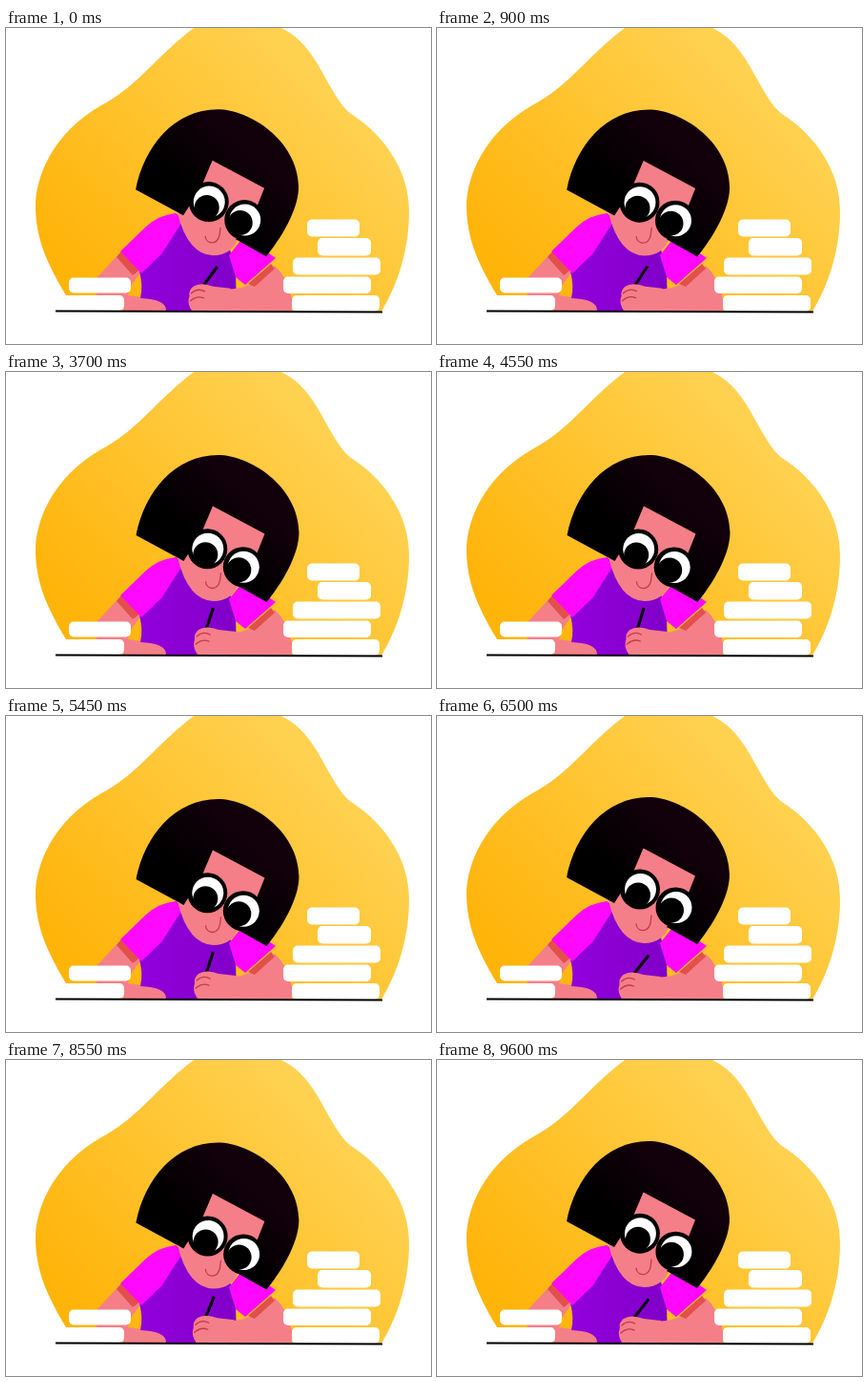
Animation, 446 px wide and 331 px high, one loop 9.65 s. Source, as an HTML page:

```html
<!DOCTYPE html>
<html lang="en">
<head>
<meta charset="utf-8">
<title>Girl writing</title>
<style>
  html, body { margin: 0; width: 100%; height: 100%; overflow: hidden; background: #fff; }
  svg { display: block; width: 100vw; height: 100vh; }
  .skin { fill: #f57f88; }
  .sleeve { fill: #ff08ff; }
  .cuff { fill: #e2504c; }
  .line { fill: none; stroke: #c43a4c; stroke-width: 1.3; stroke-linecap: round; }
</style>
</head>
<body>
<svg viewBox="0 0 446 331">
  <defs>
    <linearGradient id="sun" gradientUnits="userSpaceOnUse" x1="90" y1="260" x2="310" y2="40">
      <stop stop-color="#ffb40a"/><stop offset="1" stop-color="#ffd150"/>
    </linearGradient>
    <linearGradient id="hairShade" x1="0" y1="1" x2="1" y2="0">
      <stop offset=".4" stop-color="#000"/><stop offset=".7" stop-color="#12000a"/>
    </linearGradient>
    <linearGradient id="dress" x1="0" x2="1">
      <stop stop-color="#9300dc"/><stop offset="1" stop-color="#8000c8"/>
    </linearGradient>
  </defs>

  <path fill="url(#sun)" d="M72 297L66 285C45 250 30 222 31 182C34 145 56 104 107 77C140 58 163 25 197 0H289C328 18 337 70 362 90C398 113 423 150 423 192C423 235 410 270 394 297Z"/>

  <!-- body and left arm -->
  <path class="skin" d="M119 236L95 262V285L125 296H168C169 289 162 284 150 283L128 280L131 270L141 256Z"/>
  <path fill="url(#dress)" d="M178 194L158 225L140 255Q144 270 141 283Q168 284 168 296H242L241 255L235 232L215 225Z"/>
  <path class="cuff" d="M122 233L116 240L133 259L142 252Z"/>
  <path class="sleeve" d="M120 234L147 208Q160 196 178 194L185 203L163 237L142 257Z"/>

  <!-- right arm -->
  <path class="skin" d="M282 249L260 267Q242 276 220 273V296H300V284Q296 262 282 249Z"/>
  <path class="cuff" d="M254 268L278 247L282 252L261 271Z"/>
  <path class="sleeve" d="M234 238L250 218L283 241L251 269L241 261Z"/>

  <g id="head">
    <path class="skin" d="M216 138L275 169L262 222L244 218Q238 238 217 238Q191 237 180 194L190 165Z"/>
    <path fill="url(#hairShade)" d="M136 169C145 123 177 85 222 85C255 85 306 117 307 166C307 185 295 212 273 239L241 221L262 190L271 167.500L216.500 138.500L204 168L186 196Z"/>
    <path class="line" d="M209 218C210 226 221 228 224 217L225 209"/>
  </g>

  <g id="glasses">
    <circle cx="213" cy="181.500" r="21"/>
    <circle cx="250.500" cy="200.500" r="21"/>
    <circle cx="213.500" cy="181.500" r="16.500" fill="#fff"/>
    <circle cx="251" cy="200.500" r="16.500" fill="#fff"/>
    <circle cx="211" cy="187.500" r="13"/>
    <circle cx="246" cy="203.500" r="13"/>
  </g>

  <path id="pen" stroke="#000" stroke-width="3"/>
  <g id="hand">
    <path class="skin" d="M235 273L217 271Q204 266 196 271Q191 275 192 281Q189 289 195 297H235Z"/>
    <path class="line" d="M194 278Q201 272 208 276M193 286Q200 280 207 283"/>
  </g>

  <g fill="#fff">
    <rect x="66" y="261.500" width="65" height="16" rx="5"/>
    <rect x="56" y="280" width="68" height="16" rx="5"/>
    <rect x="316" y="200.500" width="55" height="18" rx="5"/>
    <rect x="327" y="220" width="56" height="18.500" rx="5"/>
    <rect x="301" y="240.500" width="92" height="18" rx="5"/>
    <rect x="291" y="260.500" width="92" height="17.500" rx="5"/>
    <rect x="300" y="280" width="92" height="17" rx="5"/>
  </g>
  <path stroke="#000" stroke-width="2" d="M52 296.500L395 297.500"/>
</svg>

<script>
  const LOOP = 9650, STROKE = 437.5;
  const el = id => document.getElementById(id);
  const [head, glasses, hand, pen] = ['head', 'glasses', 'hand', 'pen'].map(el);
  const move = (node, x, y) => node.setAttribute('transform', `translate(${x} ${y})`);

  // Head, eyes and hand swing together, p going from 0 to 1 and back.
  function draw(now) {
    const phase = now % LOOP / STROKE + 0.12;
    const p = (1 - Math.cos(2 * Math.PI * phase)) / 2;
    move(head, 0.5 * p, 2 * p);
    move(glasses, -1.8 * p, 4 * p);
    move(hand, 7 * p - 0.5, -p);
    pen.setAttribute('d', `M${222.5 - 5.5 * p} ${250.5 - 3.5 * p}L${206.5 + 4 * p} ${270 - p}`);
  }

  const start = performance.now();
  function frame() {
    draw(performance.now() - start);
    requestAnimationFrame(frame);
  }
  draw(0);
  requestAnimationFrame(frame);
</script>
</body>
</html>
```
